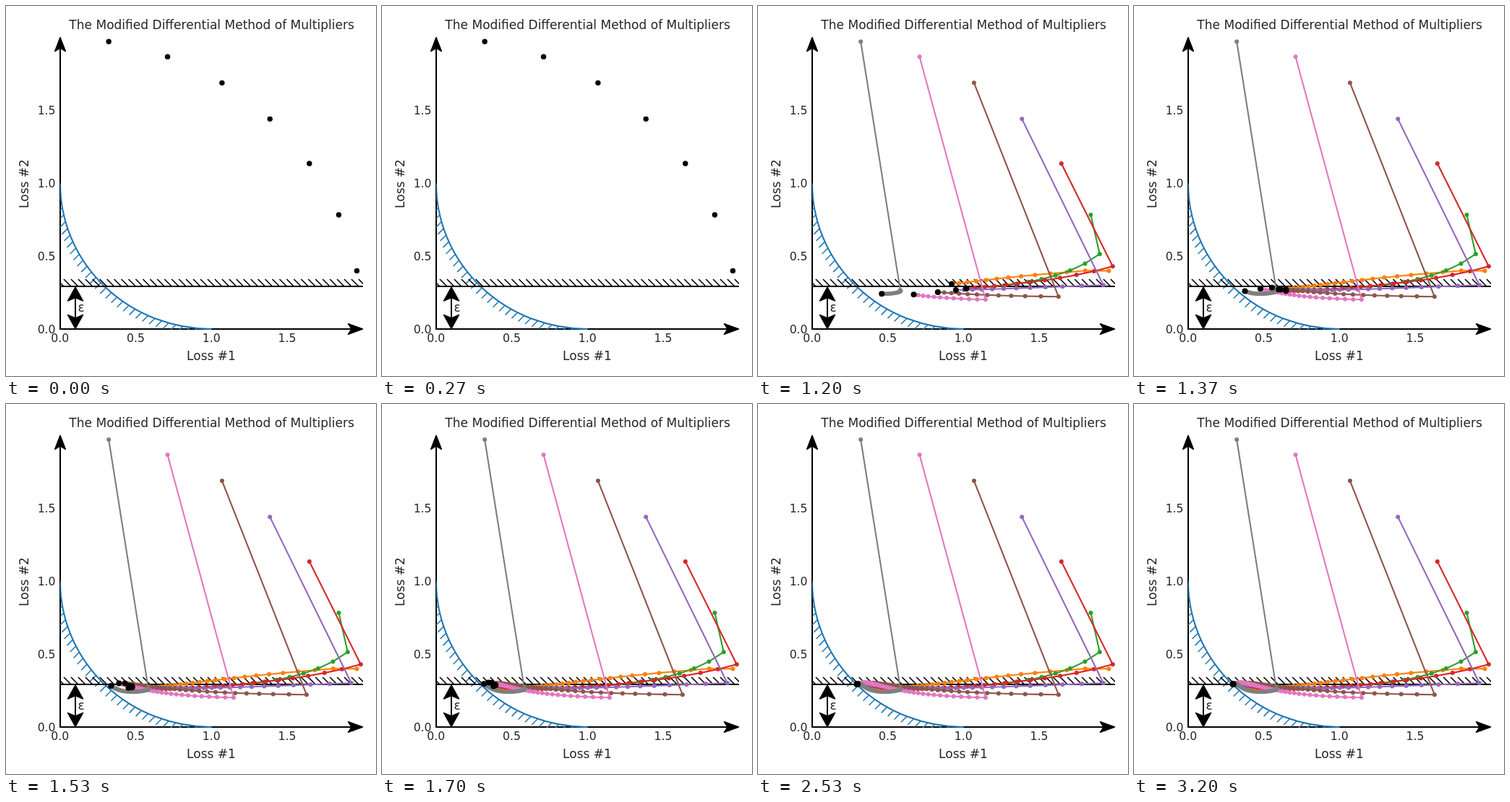
These frames come from a looping animation (512x512 px, 7660 ms). An HTML page with a canvas:

```html
<!DOCTYPE html>
<html lang="en">
<head>
<meta charset="utf-8">
<title>Method of Multipliers</title>
<style>
  html, body { margin: 0; width: 100%; height: 100%; overflow: hidden; background: #fff; }
  canvas { display: block; }
</style>
</head>
<body>
<canvas id="stage" width="512" height="512"></canvas>
<script>
const ctx = document.getElementById('stage').getContext('2d');
const LOOP = 7660, START = 1027, TICK = 100 / 3, LAST = 96;
const BLUE = '#1f77b4', INK = '#262626';
const X0 = 75, Y0 = 447, UX = 209.5, UY = 201.5, RIGHT = 494;
const HATCH = 9.95;

// Data units to pixels; the front is a unit circle around (1, 1).
const px = (x, y) => [X0 + x * UX, Y0 - y * UY];
const onFront = a => px(1 - Math.cos(a), 1 - Math.sin(a));
const GOAL = onFront(Math.PI / 4);

// Per run: offset from the goal (x, y), swing of the damped wave, short-lived kick (x, y).
const RUNS = [
  { color: '#ff7f0e', x: 316.5, y: -21.5, swing: 13, kick: [0, 0] },
  { color: '#2ca02c', x: 366, y: -4.5, swing: 14, kick: [-29.5, -40] },
  { color: '#d62728', x: 366, y: -11.5, swing: 19, kick: [-11.5, -16] },
  { color: '#9467bd', x: 330, y: -1.5, swing: 14, kick: [11.5, 0] },
  { color: '#8c564b', x: 270, y: 14.5, swing: 6, kick: [9.5, 0] },
  { color: '#e377c2', x: 191, y: 18.5, swing: 10, kick: [-12.5, 0] },
  { color: '#7f7f7f', x: 85, y: 5.5, swing: 19.7, kick: [-24.5, 0] }
];

// Starts lie on a circle of radius 2; one jump leads to the slow approach.
function position(run, i, n) {
  const a = 0.2014 * (i + 1);
  if (n === 0) return px(2 * Math.cos(a), 2 * Math.sin(a));
  const m = n - 1;
  const decay = 0.6 * 0.9 ** m + 0.4 * 0.95 ** m;
  const wave = run.y * Math.cos(0.075 * m) + run.swing * Math.sin(0.075 * m);
  const fade = 0.7 ** m;
  return [
    GOAL[0] + run.x * decay + run.kick[0] * fade,
    GOAL[1] - 0.3 + wave * Math.exp(-0.05 * m) + run.kick[1] * fade
  ];
}

const trails = RUNS.map((run, i) => ({
  color: run.color,
  pts: Array.from({ length: LAST + 1 }, (_, n) => position(run, i, n))
}));

function line(pts, color, width = 2.1) {
  ctx.beginPath();
  pts.forEach(p => ctx.lineTo(p[0], p[1]));
  ctx.strokeStyle = color;
  ctx.lineWidth = width;
  ctx.stroke();
}

function dot([x, y], r, color) {
  ctx.beginPath();
  ctx.arc(x, y, r, 0, 2 * Math.PI);
  ctx.fillStyle = color;
  ctx.fill();
}

function arrowHead(x, y, angle, length, half) {
  ctx.save();
  ctx.translate(x, y);
  ctx.rotate(angle);
  ctx.beginPath();
  ctx.moveTo(-1.5, 0);
  ctx.lineTo(-length, -half);
  ctx.lineTo(-length * 0.78, 0);
  ctx.lineTo(-length, half);
  ctx.closePath();
  ctx.fillStyle = ctx.strokeStyle = '#000';
  ctx.lineWidth = 1.5;
  ctx.fill();
  ctx.stroke();
  ctx.restore();
}

function label(text, x, y, size, align = 'center', turn = 0) {
  ctx.save();
  ctx.translate(x, y);
  ctx.rotate(turn);
  ctx.font = `${size}px "DejaVu Sans", sans-serif`;
  ctx.textAlign = align;
  ctx.fillStyle = INK;
  ctx.fillText(text, 0, 0);
  ctx.restore();
}

function clipped(draw) {
  ctx.save();
  ctx.beginPath();
  ctx.rect(X0, 43, RIGHT - X0, Y0 + 1 - 43);
  ctx.clip();
  draw();
  ctx.restore();
}

function drawAxes() {
  line([[X0, Y0 + 1], [X0, 52]], '#000', 2);
  line([[X0 - 1, Y0], [484, Y0]], '#000', 2);
  arrowHead(X0, 42, -Math.PI / 2, 20.5, 7.3);
  arrowHead(495, Y0, 0, 21.5, 7.3);

  label('The Modified Differential Method of Multipliers', 284.6, 32, 17.05);
  label('Loss #1', 284, 490, 17);
  label('Loss #2', 31.2, 246, 17, 'center', -Math.PI / 2);
  ['0.0', '0.5', '1.0', '1.5'].forEach((s, i) => {
    label(s, X0 + i * UX / 2 - 0.3, 465, 15.6);
    label(s, 68.5, Y0 + 5.6 - i * UY / 2, 15.6, 'right');
  });
}

function drawFront() {
  const stepAngle = HATCH / ((UX + UY) / 2);
  for (let a = stepAngle * 3.5; a < 1.5; a += stepAngle) {
    const [x, y] = onFront(a);
    line([[x, y], [x - 8, y + 8]], BLUE, 1.5);
  }
  ctx.beginPath();
  ctx.ellipse(...px(1, 1), UX, UY, 0, Math.PI / 2, Math.PI);
  ctx.strokeStyle = BLUE;
  ctx.lineWidth = 2.1;
  ctx.stroke();
}

function drawLimit() {
  const y = Math.round(GOAL[1]);
  for (let x = X0 + HATCH / 2; x < RIGHT + HATCH; x += HATCH) {
    line([[x - HATCH, y - HATCH], [x, y]], '#000', 1.6);
  }
  line([[X0, y], [RIGHT, y]], '#000', 2);
}

function drawEpsilon() {
  line([[96, 400], [96, 436]], '#000', 2);
  arrowHead(96, 387.5, -Math.PI / 2, 20.5, 10.5);
  arrowHead(96, 448, Math.PI / 2, 20.5, 10.5);
  label('ε', 99.5, 423, 17, 'left');
}

function drawTrails(step) {
  if (step) {
    for (const { color, pts } of trails) {
      const seen = pts.slice(0, step + 1);
      line(seen, color);
      seen.forEach(p => dot(p, 3, color));
    }
  }
  trails.forEach(({ pts }) => dot(pts[step], step ? 4 : 3.7, '#000'));
}

function render(t) {
  const ticks = Math.floor((t - START) / TICK);
  const step = ticks < 0 ? 0 : Math.min(LAST, 2 + 2 * ticks);
  ctx.fillStyle = '#fff';
  ctx.fillRect(0, 0, 512, 512);
  ctx.lineJoin = 'round';
  drawAxes();
  clipped(drawFront);
  clipped(drawLimit);
  drawEpsilon();
  drawTrails(step);
}

const born = performance.now();
function frame() {
  render((performance.now() - born) % LOOP);
  requestAnimationFrame(frame);
}
frame();
</script>
</body>
</html>
```
